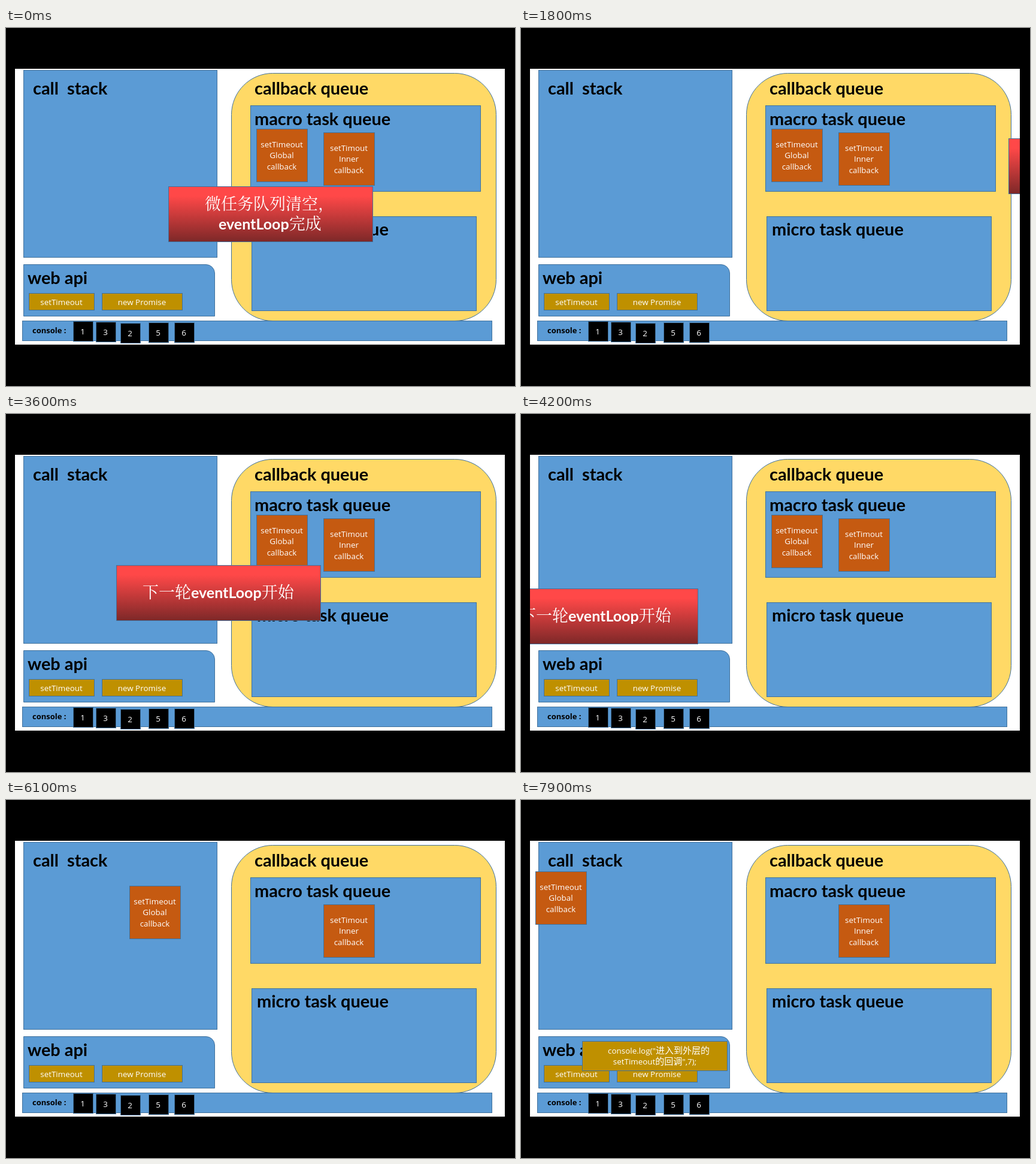
These frames come from a looping animation (850x597 px, 8000 ms). An HTML page:

```html
<!DOCTYPE html>
<html lang="zh">
<head>
<meta charset="utf-8">
<style>
  html, body { margin: 0; width: 100%; height: 100%; overflow: hidden; background: #000; }
  svg { display: block; }
  text { white-space: pre; }
  .panel { fill: #5b9bd5; }
  .panel, .queue, .task, .call, .out, .banner { stroke: #41719c; }
  .queue { fill: #ffd966; }
  .task { fill: #c55a11; }
  .call { fill: #bf9000; }
  .out { fill: #000; }
  .banner { fill: url(#red); }
  .head { font: 700 28.9px Lato, Carlito, sans-serif; }
  .small { font: 13.4px "Open Sans", "Noto Sans CJK SC", sans-serif; fill: #fff; text-anchor: middle; }
  .label { font: 700 13px "Open Sans", sans-serif; }
  .big { font: 700 25px Lato, Carlito, sans-serif; fill: #fff; }
  .zh { font: 400 27px "Noto Serif CJK SC", "Noto Sans CJK SC", serif; }
  .small .zh { font: 15px "Noto Sans CJK SC", sans-serif; }
</style>
</head>
<body>
<svg width="850" height="597" viewBox="0 0 850 597">
  <defs>
    <linearGradient id="red" x1="0" y1="0" x2="0" y2="1">
      <stop offset=".17" stop-color="#ff4848"/>
      <stop offset="1" stop-color="#7d2828"/>
    </linearGradient>
  </defs>
  <svg x="15" y="68" width="818" height="460" viewBox="15 68 818 460">
    <rect x="15" y="68" width="818" height="460" fill="#fff"/>
    <rect class="panel" x="29.5" y="70.5" width="323" height="312"/>
    <rect class="queue" x="376.5" y="75.5" width="442" height="413" rx="69"/>
    <rect class="panel" x="408.5" y="129.5" width="384" height="143"/>
    <rect class="panel" x="410.5" y="314.5" width="375" height="157"/>
    <path class="panel" d="M29.5 394.5H334a14.5 14.5 0 0 1 14.5 14.5V480.5H29.5Z"/>
    <rect class="panel" x="27.5" y="488.5" width="784" height="33"/>
    <g class="head">
      <text x="45" y="111">call  stack</text>
      <text x="415" y="111">callback queue</text>
      <text x="415" y="162">macro task queue</text>
      <text x="419" y="346">micro task queue</text>
      <text x="36" y="427">web api</text>
    </g>
    <text class="label" x="44" y="509">console :</text>
    <g id="fixed" class="small">
      <rect class="call" x="38.5" y="442.5" width="109" height="28"/>
      <text x="92.5" y="462">setTimeout</text>
      <rect class="call" x="160.5" y="442.5" width="134" height="28"/>
      <text x="227" y="462">new Promise</text>
    </g>
    <g class="small" transform="translate(530 174)">
      <rect class="task" x=".5" y=".5" width="85" height="88"/>
      <text x="42.5" y="31">setTimout</text>
      <text x="42.5" y="49">Inner</text>
      <text x="42.5" y="68">callback</text>
    </g>
    <g id="task" class="small">
      <rect class="task" x=".5" y=".5" width="85" height="88"/>
      <text x="42.5" y="31">setTimeout</text>
      <text x="42.5" y="49">Global</text>
      <text x="42.5" y="68">callback</text>
    </g>
    <g id="log" class="small">
      <rect class="call" x=".5" y=".5" width="242" height="49"/>
      <text x="128" y="21">console.log("<tspan class="zh">进入到外层的</tspan></text>
      <text x="121.5" y="39">setTimeout<tspan class="zh">的回调</tspan>",7);</text>
    </g>
    <g id="done" class="big">
      <rect class="banner" x=".5" y=".5" width="341" height="92"/>
      <text class="zh" x="61" y="39">微任务队列清空，</text>
      <text x="84" y="72">eventLoop<tspan class="zh">完成</tspan></text>
    </g>
    <g id="next" class="big">
      <rect class="banner" x=".5" y=".5" width="341" height="92"/>
      <text x="44" y="55"><tspan class="zh">下一轮</tspan>eventLoop<tspan class="zh">开始</tspan></text>
    </g>
  </svg>
</svg>
<script>
const $ = id => document.getElementById(id);

// console output: digit, left, top
for (const [n, x, y] of [[1, 112, 489], [3, 150, 490], [2, 191, 492], [5, 238, 491], [6, 281, 491]]) {
  $('fixed').innerHTML += `<rect class="out" x="${x + .5}" y="${y + .5}" width="33" height="33"/>
    <text x="${x + 16}" y="${y + 22}">${n}</text>`;
}

function place(id, pos) {
  const el = $(id);
  el.style.display = pos ? '' : 'none';
  if (pos) el.setAttribute('transform', `translate(${pos.map(Math.round).join(' ')})`);
}

// straight path with constant acceleration, then constant braking
function glide(t, start, time, [x0, y0], [x1, y1]) {
  const u = Math.min(1, Math.max(0, (t - start) / time));
  const e = u < .5 ? 2 * u * u : 1 - 2 * (1 - u) ** 2;
  return [x0 + (x1 - x0) * e, y0 + (y1 - y0) * e];
}

function nextBanner(t) {
  if (t < 1800 || t >= 5000) return null;
  if (t > 3250) return glide(t, 3250, 2000, [220, 246], [-370, 346]);
  const s = (t - 1800) / 100;
  const x = t < 2700 ? 814 - 30 * s - 2.1 * s * s
                     : 255 + 123 * Math.max(0, 1 - (t - 2700) / 500) ** 2;
  return [x, 184 + (814 - x) * .1216];
}

function draw(now) {
  const t = Math.floor(now % 8000 / 100) * 100;
  place('done', t < 1200 && glide(t, -550, 2000, [380, 261.4], [-341, 278.6]));
  place('next', nextBanner(t));
  place('task', t < 5200 ? [418, 168] : glide(t, 5110, 1900, [421, 171], [24, 119]));
  const left = (7900 - t) / 100;
  place('log', t >= 7700 && [102 - 4 * left, 402 + 43 * left]);
}

const begin = performance.now();
function tick() {
  draw(performance.now() - begin);
  requestAnimationFrame(tick);
}
tick();
</script>
</body>
</html>
```
